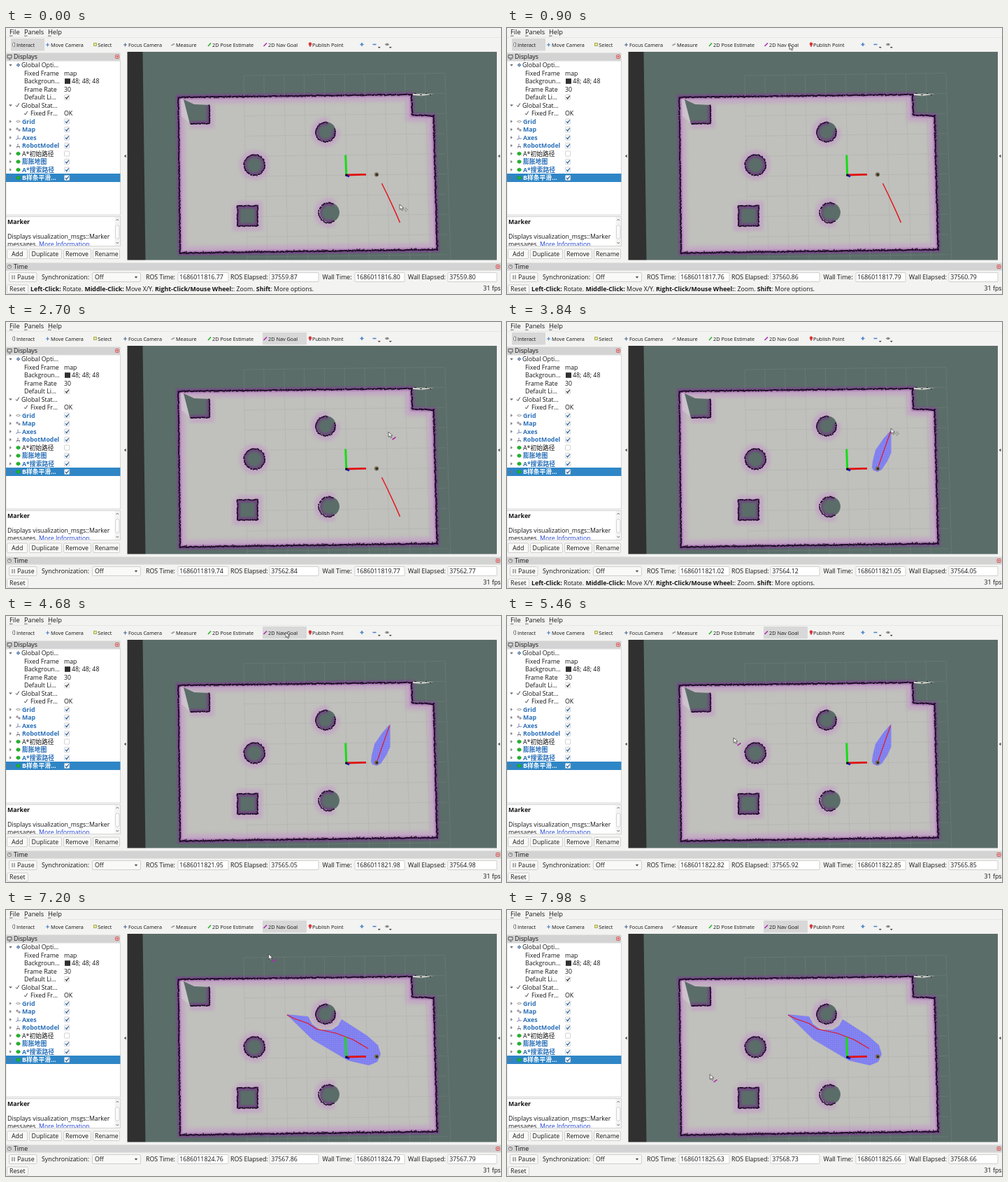
Animation, 708 px wide and 380 px high, one loop 8000 ms. Source, as an HTML page:

```html
<!DOCTYPE html>
<html lang="en">
<head>
<meta charset="utf-8">
<title>Path planning in a map viewer</title>
<style>
html, body { margin: 0; width: 100%; height: 100%; overflow: hidden; background: #f3f3f2; }
svg { display: block; width: 708px; height: 380px; }
text { font: 500 8.8px "Open Sans", "Noto Sans", "Noto Sans CJK SC", sans-serif; fill: #141414; white-space: pre; }
.menu { font-size: 9.2px; }
.tool { font-size: 7.3px; }
.bold, .blue { font-weight: 700; }
.blue { fill: #2a70b8; }
.white { fill: #fff; }
.link { fill: #1c3fd0; text-decoration: underline; }
</style>
</head>
<body>
<svg id="stage" viewBox="0 0 708 380">
  <defs>
    <filter id="soft" x="-30%" y="-30%" width="160%" height="160%"><feGaussianBlur stdDeviation="2.6"/></filter>
    <filter id="softer" x="-30%" y="-30%" width="160%" height="160%"><feGaussianBlur stdDeviation="1.3"/></filter>
    <clipPath id="view"><rect x="173" y="34" width="530" height="298"/></clipPath>
    <clipPath id="note"><rect x="0" y="270" width="154" height="41"/></clipPath>
    <pattern id="mesh" width="3" height="3" patternUnits="userSpaceOnUse">
      <rect width="3" height="3" fill="#8585f6"/><path d="M0 .5H3M.5 0V3" stroke="#7a7ae6" stroke-width=".6"/>
    </pattern>
  </defs>
  <g id="scene" clip-path="url(#view)"></g>
  <g id="panel"></g>
  <g id="cursor">
    <g id="cross"><path d="M6 7.5h6M9 4.5v6" stroke="#777" stroke-width="1.4"/><path d="M6.5 7.5h5M9 5v5" stroke="#ddd" stroke-width=".6"/></g>
    <path id="goalMark" d="M5.5 11L10.5 7.5" stroke="#b02ab0" stroke-width="1.6"/>
    <path d="M0 0L.2 7.3L2 5.8L3.3 8.6L4.6 8L3.4 5.3L5.8 5.1Z" fill="#fff" stroke="#333" stroke-width=".7"/>
  </g>
</svg>
<script>
const $ = id => document.getElementById(id);
const scene = $('scene'), panel = $('panel');

function add(parent, tag, attrs, text) {
  const el = document.createElementNS('http://www.w3.org/2000/svg', tag);
  for (const k in attrs) el.setAttribute(k, attrs[k]);
  if (text !== undefined) el.textContent = text;
  return parent.appendChild(el);
}
const path = (d, attrs, parent = scene) => add(parent, 'path', { d, fill: 'none', ...attrs });
const box = (x, y, width, height, fill, attrs = {}) => add(panel, 'rect', { x, y, width, height, fill, ...attrs });
const label = (x, mid, text, cls = '', attrs = {}) =>
  add(panel, 'text', { x, y: mid + 3.1, class: cls, ...attrs }, text);
const icon = (d, stroke, width = 1.2, fill = 'none') => path(d, { stroke, 'stroke-width': width, fill }, panel);
const line = points => 'M' + points.map(p => p.join(' ')).join('L');
const poly = points => line(points) + 'Z';

let seed = 7;
const random = () => (seed = seed * 16807 % 2147483647) / 2147483647;

// Rough occupied cells along a polyline
function cells(points, size, jitter) {
  let d = '';
  points.slice(1).forEach(([x2, y2], i) => {
    const [x1, y1] = points[i], n = Math.max(1, Math.round(Math.hypot(x2 - x1, y2 - y1) / 1.6));
    for (let k = 0; k < n; k++) {
      const x = x1 + (x2 - x1) * k / n + (random() - .5) * jitter - size / 2;
      const y = y1 + (y2 - y1) * k / n + (random() - .5) * jitter - size / 2;
      d += `M${x.toFixed(1)} ${y.toFixed(1)}h${size}v${size}h-${size}z`;
    }
  });
  path(d, { fill: '#1d0a26' });
}
function arc(cx, cy, r, from = 0, to = 360) {
  const points = [];
  for (let a = from; a <= to; a += 15) {
    const t = a * Math.PI / 180;
    points.push([cx + r * Math.cos(t), cy + r * Math.sin(t)]);
  }
  return points;
}

function buildMap() {
  path('M173 34H703V332H173Z', { fill: '#5b6d69' });
  path('M173 34H195.5L199.5 332H173Z', { fill: '#2f302f' });
  const room = [[246.5, 99], [580, 95], [581, 124.5], [611.5, 125.5], [616.5, 316.5], [249, 321.5]];
  const outline = poly(room);
  add(add(scene, 'clipPath', { id: 'room' }), 'path', { d: outline });
  path(outline, { stroke: '#7d3f92', 'stroke-width': 7, opacity: .75, filter: 'url(#softer)' });
  path(outline, { fill: '#c0c0bc' });
  const inside = add(scene, 'g', { 'clip-path': 'url(#room)' });
  path(outline, { stroke: '#c58fcc', 'stroke-width': 18, opacity: .5, filter: 'url(#soft)' }, inside);
  path(outline, { stroke: '#8b3e9d', 'stroke-width': 5, opacity: .5, filter: 'url(#softer)' }, inside);
  path('M250 101L255 103L264 137L251 126Z', { fill: '#d6ced6', opacity: .6 }, inside);

  let grid = '';
  for (let i = 0; i <= 10; i++) {
    const s = i * 28.8;
    grid += `M${340 + s} ${68 - i * .35}L${345 + s * 1.01} 332`;
    grid += `M${340 + i * .5} ${68 + s}L${627 + i * .5} ${64.5 + s}`;
  }
  path(grid, { stroke: '#909c98', 'stroke-width': .6, opacity: .38 });

  const corner = [[254, 102], [269, 109], [291, 110], [291, 136.5], [263, 137]];
  const square = [[331, 254], [360, 254], [360, 282.5], [331, 283]];
  const shapes = [
    [corner, [[291, 110], [291, 136.5], [263, 137]]],
    [square, [...square, square[0]]],
    [arc(458, 148, 13.8), arc(457, 148.8, 14, -15, 285)],
    [arc(355.5, 195.8, 14.5), arc(355.3, 195.8, 14.8)],
    [arc(463, 263.5, 14), arc(461.7, 264, 14.3, 60, 300)]
  ];
  shapes.forEach(([shape, edge], i) => {
    path(line(edge), { stroke: '#c58fcc', 'stroke-width': 13, opacity: .5, filter: 'url(#soft)' });
    path(poly(shape), { fill: '#5b6d69' });
    add(add(scene, 'clipPath', { id: 'shape' + i }), 'path', { d: poly(shape) });
    const inner = add(scene, 'g', { 'clip-path': `url(#shape${i})` });
    path(line(edge), { stroke: '#7b328e', 'stroke-width': 8, opacity: .6, filter: 'url(#softer)' }, inner);
    cells(edge, 1.8, 1);
  });

  cells([...room, room[0]], 2, 1.1);
  let teeth = '';
  for (let x = 252; x < 614; x += 2) {
    if (random() < .4) teeth += `M${x} ${321.5 - (x - 249) * .0136}v${(-1 - random() * 2).toFixed(1)}`;
    if (random() < .25 && x < 580) teeth += `M${x} ${99 - (x - 247) * .012}v2`;
  }
  for (let y = 130; y < 315; y += 2) if (random() < .35) teeth += `M${611.5 + (y - 126) * .026} ${y}h2.5`;
  path(teeth, { stroke: '#241029', 'stroke-width': 1.2 });
  path('M582 94L612 94.5L594 97L582 96Z', { fill: '#d2d2ce' });
  path('M584 93.5h3M592 95.5h3M600 93.5h2M606 95.5h2', { stroke: '#222', 'stroke-width': 1 });
}

function buildPaths() {
  const plan = (area, route, width) => {
    const g = add(scene, 'g', {});
    if (area) path(poly(area), { fill: 'url(#mesh)' }, g);
    path(route, { stroke: '#e5151c', 'stroke-width': width }, g);
    return g;
  };
  const plans = [
    plan(null, 'M537.5 222Q551.5 250 563.5 278', 1.5),
    plan([[522, 208], [523, 199], [527, 183], [538, 167], [549.5, 154], [549.5, 187], [544, 199], [536, 211],
      [530, 214], [524, 212]], 'M531 207Q536 192 548.5 157', 1.1),
    plan([[401, 149], [432, 152], [438, 163], [449, 171], [466, 171], [475, 165], [480, 156], [516, 179], [532, 193],
      [536, 206], [531, 217], [519, 222], [489, 215], [438, 185]],
      'M402 150L412 155L432 162L444 170L472 176L496 185L518 198', 1.2)
  ];
  path('M486.5 210L515 209.3', { stroke: '#e01212', 'stroke-width': 2.8 });
  path('M486.7 210L485.7 181.5', { stroke: '#17dc17', 'stroke-width': 3 });
  path('M485.5 209.5L491 212.2', { stroke: '#1717c8', 'stroke-width': 2.8 });
  path('M485.5 208.7h3v3h-3z', { fill: '#111' });
  add(scene, 'circle', { cx: 530, cy: 209.3, r: 3.1, fill: '#756a50' });
  add(scene, 'circle', { cx: 530.5, cy: 209.5, r: 1.5, fill: '#272520' });
  return plans;
}

function button(x, y, w, h, text, textX) {
  box(x, y, w, h, '#f9f9f8', { stroke: '#c6c6c6', 'stroke-width': .8, rx: 1.5 });
  label(textX, y + h / 2 - .2, text);
}
function field(x, w, mid, text) {
  box(x, 349.5, w, 13, '#fff', { stroke: '#c6c6c6', 'stroke-width': .8, rx: 1 });
  return label(x + 2.2, mid, text);
}
function closeBox(x, y) {
  box(x, y, 5, 5, '#f0c4c4', { stroke: '#c83a3a', 'stroke-width': .8, rx: 1 });
  icon(`M${x + 1.5} ${y + 1.5}l2 2m0-2l-2 2`, '#b22', .7);
}

function buildToolbar() {
  box(0, 0, 708, 34, '#f3f3f2');
  [[5, 'File'], [26, 'Panels'], [60, 'Help']].forEach(([x, t]) => {
    label(x, 6.3, t, 'menu');
    icon(`M${x} 11.3h4.5`, '#333', .7);
  });
  box(0, 13, 708, .6, '#dedede');
  const marks = [box(7, 15, 48, 17.5, '#d8d8d8', { rx: 1 }), box(367, 15, 63, 17.5, '#d8d8d8', { rx: 1 })];
  [[15, 'Interact'], [64, 'Move Camera'], [131.3, 'Select'], [175, 'Focus Camera'], [243, 'Measure'],
    [295, '2D Pose Estimate'], [375, '2D Nav Goal'], [438, 'Publish Point']].forEach(([x, t]) => label(x, 23.8, t, 'tool'));
  icon('M9.5 25.5v-3l1-1.5h2v5.5h-2z', '#777', .9, '#eee');
  icon('M57 24h5M59.5 21.5v5', '#447cc0', 1);
  icon('M125.5 21.5h4v4h-4z', '#a5a53c', .9, '#dfe6a0');
  icon('M168 24h5M170.5 21.5v5', '#468', 1);
  icon('M236.5 25l4.5-2.5', '#999', 1.6);
  icon('M289 26l4-4.5', '#28b828', 1.6);
  icon('M368.5 26l4.5-4.5', '#b02ab0', 1.6);
  icon('M435 27l-1.8-3.5a2 2 0 1 1 3.6 0z', '#c22', .5, '#d33');
  icon('M506.5 23.5h5M509 21v5M524.5 23.5h5', '#4a80c4', 1.5);
  icon('M532 27h3.5l-1.7 2zM548 27h3.5l-1.7 2z', '#444', .2, '#444');
  icon('M542 23.5q3-3 6 0q-3 3-6 0z', '#777', .8, '#ddd');
  icon('M544.5 23.5h1.2', '#222', 1.4);
  return marks;
}

function buildDisplays() {
  box(0, 34, 173.5, 301, '#f3f3f2');
  box(0, 35.5, 163.5, 11, '#d3d3d3');
  icon('M2 38.5h6v4.5h-6zM4 45h2.5', '#555', 1);
  label(11, 41, 'Displays');
  closeBox(156.5, 38.5);
  box(0, 47, 163.5, 220, '#fff', { stroke: '#c8c8c8', 'stroke-width': .7 });
  box(0, 208, 163.5, 12, '#2f86c6');

  const rows = [
    [22, 'Global Opti…'], [26, 'Fixed Frame', 'map'], [26, 'Backgroun…', '48; 48; 48'], [26, 'Frame Rate', '30'],
    [26, 'Default Li…', true], [22, 'Global Stat…'], [35, 'Fixed Fr…', 'OK'],
    [23, 'Grid', true], [23, 'Map', true], [23, 'Axes', true], [23, 'RobotModel', true],
    [23, 'A*初始路径', false], [23, '膨胀地图', true], [23, 'A*搜索路径', true], [23, 'B样条平滑…', true]
  ];
  rows.forEach(([x, name, value], i) => {
    const y = 53 + i * 11.5, open = i === 0 || i === 5;
    label(x, y, name, i === 14 ? 'white bold' : i > 6 && value ? 'blue' : '');
    if (open) icon(`M4.5 ${y - 1}h4l-2 2.5z`, '#555', .2, '#666');
    else if (i > 6) icon(`M5.3 ${y - 2}v4l2.5-2z`, '#777', .2, '#777');
    if (i === 5 || i === 6) icon(`M${i === 5 ? 14 : 26} ${y}l1.7 2l3-5`, '#444', 1);
    if (i >= 11) {
      icon(`M17.5 ${y - 2.6}l2.6 1.3v2.6l-2.6 1.3l-2.6-1.3v-2.6z`, '#128c18', .5, '#20b52a');
    } else if (i === 0) {
      icon(`M17.5 ${y - 2}l2 2l-2 2l-2-2z`, '#5477a5', 1.1, '#b7cbe2');
    } else if (i === 7) {
      icon(`M14.5 ${y}l3-1.5l3 1.5l-3 1.5z`, '#888', .8);
    } else if (i === 8) {
      icon(`M15 ${y - 2}h2v2h-2zM18 ${y}h2v2h-2z`, '#667', .8);
    } else if (i === 9) {
      icon(`M17 ${y + 1.5}v-4.5M17 ${y + 1.5}h4M17 ${y + 1.5}l-3 1.5`, '#6b78a8', .9);
    } else if (i === 10) {
      icon(`M17 ${y - 2.5}v3M15 ${y + 1.5}h5M15 ${y + 3}h1M19 ${y + 3}h1`, '#667', 1);
    }
    if (typeof value === 'boolean') {
      box(83.5, y - 3.6, 7.2, 7.2, '#fff', { stroke: '#c0c0c0', 'stroke-width': .7, rx: 1 });
      if (value) icon(`M85 ${y}l1.7 2l3-4.2`, i === 4 ? '#333' : '#245f9f', 1.2);
    } else if (value) {
      if (i === 2) box(84, y - 3.8, 8, 7.6, '#303030');
      label(i === 2 ? 94 : 83, y, value);
    }
  });

  box(0, 269.5, 163.5, 42, '#fff', { stroke: '#c8c8c8', 'stroke-width': .7 });
  label(2, 277, 'Marker', 'bold');
  label(2, 298, 'Displays visualization_msgs::Marker', '', { 'clip-path': 'url(#note)' });
  const note = label(2, 309, 'messages. ', '', { 'clip-path': 'url(#note)' });
  add(note, 'tspan', { class: 'link' }, 'More Information.');
  box(155.5, 270, 7.5, 41, '#f3f3f3');
  box(156.5, 282, 5.5, 19, '#fbfbfb', { stroke: '#c4c4c4', 'stroke-width': .7, rx: 2 });
  icon('M157.5 275l1.8-2l1.8 2M157.5 306l1.8 2l1.8-2', '#555', .8);
  button(1.5, 316, 29, 13.5, 'Add', 8);
  button(33.5, 316, 46, 13.5, 'Duplicate', 36.5);
  button(82.5, 316, 39, 13.5, 'Remove', 85);
  button(124.5, 316, 38, 13.5, 'Rename', 127);
  icon('M171.5 181v4l-2.5-2z', '#444', .2, '#444');
}

function buildTime() {
  box(702, 34, 6, 301, '#f3f3f2');
  icon('M706.3 181v4l-2.5-2z', '#444', .2, '#444');
  box(0, 331.5, 708, 48.5, '#f3f3f2');
  box(0, 335.5, 708, 11, '#d3d3d3');
  add(panel, 'circle', { cx: 5, cy: 341, r: 2.6, fill: '#eee', stroke: '#666', 'stroke-width': .8 });
  icon('M5 339v2h1.5', '#555', .7);
  label(11, 341, 'Time');
  closeBox(701, 338.5);
  button(4.5, 349.5, 39.5, 13, 'Pause', 16);
  icon('M9 353v6M12 353v6', '#888', 1.4);
  label(51, 356, 'Synchronization:');
  button(123.5, 349.5, 69, 13, 'Off', 127);
  icon('M184 355h4l-2 2.5z', '#444', .2, '#444');
  [[200, 'ROS Time:'], [321, 'ROS Elapsed:'], [452.5, 'Wall Time:'], [575, 'Wall Elapsed:']]
    .forEach(([x, t]) => label(x, 356, t));
  const fields = [[246, 72], [377, 70], [499, 71], [632, 70]].map(([x, w]) => field(x, w, 356, ''));
  button(1.5, 367, 30, 12, 'Reset', 5);
  label(707.5, 372.3, '31 fps', '', { 'text-anchor': 'end' });
  const help = label(35, 373.2, '');
  [['Left-Click:', 1], [' Rotate. ', 0], ['Middle-Click:', 1], [' Move X/Y. ', 0], ['Right-Click/Mouse Wheel:', 1],
    [': Zoom. ', 0], ['Shift', 1], [': More options.', 0]]
    .forEach(([t, strong]) => add(help, 'tspan', strong ? { class: 'bold' } : {}, t));
  return { fields, help };
}

buildMap();
const plans = buildPaths();
const toolMarks = buildToolbar();
buildDisplays();
const { fields, help } = buildTime();

// time, x, y of the pointer tip
const pointer = [
  [0, 563, 252], [150, 560, 245], [760, 408, 24], [1080, 398, 23], [1620, 550, 147], [1740, 552.5, 153],
  [2300, 549, 158], [2700, 547, 157], [3200, 549, 152], [3840, 549, 152], [4060, 540, 138], [4560, 402, 24],
  [4800, 398, 23], [5300, 324, 170], [5460, 324, 174], [5700, 401, 150], [6100, 402, 142], [6600, 395, 70],
  [6840, 398, 24], [7060, 398, 23], [7500, 304, 190], [7740, 293, 222], [8000, 290, 235]
];
// time, clock seconds
const clock = [[0, 0], [1740, 1.92], [2700, 2.97], [3840, 4.25], [5460, 6.045], [6600, 7.325], [8000, 8.88]];
// time, state
const navTool = [[0, false], [1050, true], [3120, false], [4680, true], [5730, false], [6960, true]];
const helpShown = [[0, true], [1050, false], [3420, true], [4680, false], [5940, true], [6960, false]];
const planShown = [[0, 0], [3210, 1], [7080, 2]];
const starts = [1686011816.77, 37559.87, 1686011816.80, 37559.80];

const current = (table, t) => table.filter(row => row[0] <= t).pop()[1];
function between(table, t, col, ease = u => u) {
  const i = Math.max(1, table.findIndex(row => row[0] > t));
  const a = table[i - 1], b = table[i];
  return a[col] + (b[col] - a[col]) * ease((t - a[0]) / (b[0] - a[0]));
}
const smooth = u => u * u * (3 - 2 * u);
const show = (el, on) => { el.style.display = on ? '' : 'none'; };

function draw(now) {
  const t = Math.floor((now % 8000) / 30) * 30;
  const x = between(pointer, t, 1, smooth), y = between(pointer, t, 2, smooth);
  const nav = current(navTool, t), inView = y > 35, seconds = between(clock, t, 1);
  $('cursor').setAttribute('transform', `translate(${x.toFixed(1)} ${y.toFixed(1)})`);
  show($('cross'), inView && !nav);
  show($('goalMark'), inView && nav);
  show(toolMarks[0], !nav);
  show(toolMarks[1], nav);
  show(help, current(helpShown, t));
  plans.forEach((plan, i) => show(plan, i === current(planShown, t)));
  fields.forEach((f, i) => { f.textContent = (starts[i] + seconds).toFixed(2); });
}

const begin = performance.now();
function loop() {
  draw(performance.now() - begin);
  requestAnimationFrame(loop);
}
loop();
</script>
</body>
</html>
```
